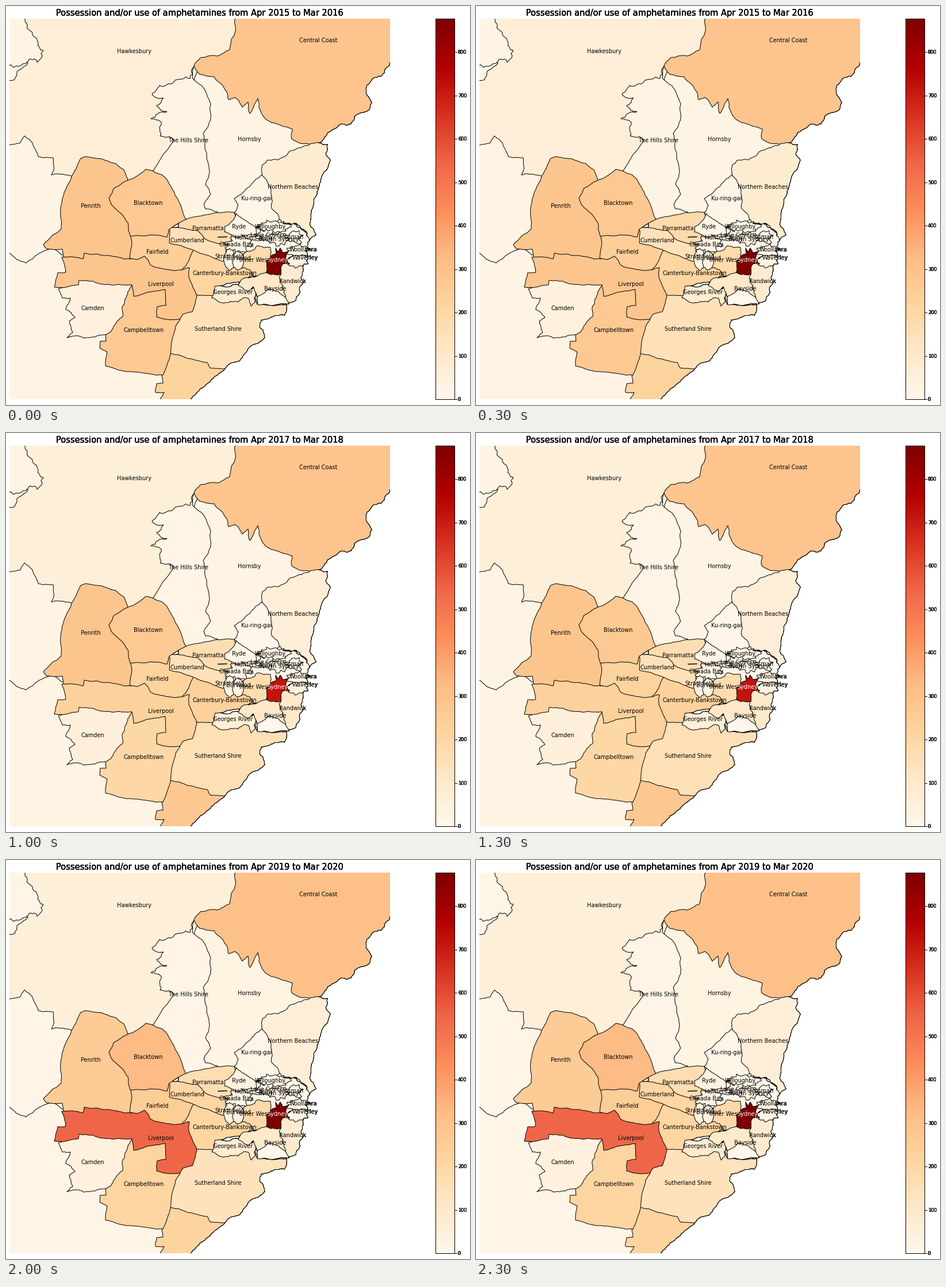
A matplotlib script for the animation above (2.5 s loop, 807 by 694 pixels).

```python
import numpy as np
import matplotlib.pyplot as plt
from matplotlib.animation import FuncAnimation
from matplotlib.collections import PolyCollection
from matplotlib.patches import Rectangle

W, H, DPI = 807, 694, 64
PX = 72 / DPI          # points per pixel
VMAX = 877
PASSES = 4             # repeated drawing thickens coast lines and outer text
LEFT, TOP, SIZE = 6, 22, 662
BAR_X, BAR_W = 747, 33
CMAP = plt.get_cmap("OrRd")
rng = np.random.default_rng(7)

shapes, values, labels = [], [], []


def split(a, b, amp):
    """Fractal line from a to b, without b, by midpoint displacement."""
    d = b - a
    if abs(d) < 4.5:
        return [a]
    shift = rng.uniform(-1, 1) * min(amp, 3.5 / abs(d))
    mid = (a + b) / 2 + 1j * d * shift
    return split(a, mid, amp) + split(mid, b, amp)


def rough(amp, *xy):
    pts = [complex(x, y) for x, y in zip(xy[::2], xy[1::2])]
    line = [p for a, b in zip(pts, pts[1:]) for p in split(a, b, amp)]
    return [(p.real, p.imag) for p in line + pts[-1:]]


def blob(x, y, rx, ry, jag):
    """Ragged ellipse for the small harbour suburbs."""
    t = np.linspace(0, 2 * np.pi, int(rx + ry), endpoint=False)
    r = 1 + jag * rng.uniform(-1, 1, t.size)
    return list(zip(x + rx * r * np.cos(t), y + ry * r * np.sin(t)))


def region(name, x, y, vals, shape):
    shapes.append(shape)
    values.append(np.broadcast_to(vals, 5))
    labels.append((name, x, y))


def suburb(name, x, y, val, rx, ry, jag=.3, dx=0, dy=0):
    region(name, x, y, val, blob(x + dx, y + dy, rx, ry, jag))


# Later regions cover earlier ones, so each shared border is traced once.
WEST = [26, 24, 24, 14, 16]
region("", 0, 0, WEST, rough(0, -20, 400, 150, 400, 330, 560, 290, 720, -20, 720))
region("", 0, 0, WEST, rough(
    .1, -20, 200, 130, 200, 130, 430, 97, 433, 79, 421, 58, 430, 35, 447,
    5, 429, -20, 425))
region("Hawkesbury", 223, 79, [68, 70, 62, 58, 62], rough(
    .1, -20, 5, 450, 5, 450, 60, 335, 140, 300, 300, 150, 310, 112, 295,
    79, 294, 82, 264, 56, 262, 46, 238, 32, 226, 25, 238, -20, 240))
region("", 0, 0, WEST, rough(.1, -20, 95, 38, 99, 19, 114, 15, 128, -20, 140))
region("", 0, 0, WEST, rough(
    .25, -20, 5, 36, 5, 33, 24, 46, 50, 65, 78, 54, 98, 42, 92, 24, 104, -20, 106))
region("Hornsby", 423, 232, [25, 25, 25, 42, 32], rough(
    0, 335, 108, 430, 130, 505, 220, 542, 238, 540, 260, 440, 350, 400, 375,
    350, 375, 315, 250, 328, 125))
region("Central Coast", 543, 60, [290, 375, 290, 318, 308], rough(
    .08, 401, 5, 399, 44, 389, 76, 366, 87, 338, 90, 327, 103, 337, 119,
    362, 123, 383, 148, 387, 163, 398, 159, 411, 176, 421, 167, 424, 187,
    438, 161, 446, 190, 462, 203, 498, 214, 497, 231, 512, 239, 544, 238)
    + rough(
    .2, 544, 238, 578, 208, 600, 205, 606, 192, 632, 180, 636, 168, 627, 154,
    632, 134, 658, 116, 669, 96, 690, 90, 690, 5))
region("The Hills Shire", 317, 234, [28, 22, 22, 20, 22], rough(
    .08, 327, 105, 324, 125, 341, 139, 356, 170, 356, 198, 343, 222, 349, 266,
    354, 288, 347, 310, 356, 327, 344, 345, 347, 353, 368, 358, 360, 375,
    310, 380, 270, 310, 253, 291)
    + rough(
    .03, 253, 291, 292, 234)
    + rough(
    .25, 292, 234, 268, 226, 270, 206, 252, 196, 280, 184, 262, 173, 274, 160,
    254, 154, 267, 138, 292, 132, 320, 126, 325, 108))
region("Northern Beaches", 499, 315, [85, 65, 68, 72, 66], rough(
    .15, 435, 345, 440, 330, 446, 294, 446, 276, 482, 263, 495, 252, 544, 238,
    559, 241, 556, 256, 564, 268, 549, 296, 541, 322, 533, 352, 528, 380,
    539, 398, 527, 409, 524, 396, 505, 378, 480, 376, 450, 370))
region("", 0, 0, [225, 305, 275, 225, 218], rough(
    .1, 270, 595, 340, 595, 390, 615, 380, 632, 346, 661, 320, 686, 315, 710,
    255, 710, 275, 672, 260, 672, 262, 657, 273, 656, 271, 636))
region("Sutherland Shire", 369, 562, [150, 150, 155, 150, 142], rough(
    .06, 290, 540, 310, 500, 430, 500, 437, 519, 488, 520)
    + rough(
    .15, 488, 520, 484, 538, 444, 546, 441, 558, 450, 577, 418, 602, 380, 631)
    + rough(
    .06, 380, 631, 356, 630, 350, 620, 284, 604, 275, 590))
region("Campbelltown", 240, 564, [268, 240, 200, 218, 215], rough(
    .05, 270, 480, 295, 535, 303, 545, 295, 557, 288, 584, 284, 614, 273, 642,
    173, 626, 176, 602, 163, 595, 164, 583, 174, 583, 172, 550, 205, 485))
region("Camden", 151, 526, [42, 30, 55, 42, 45], rough(
    .12, 91, 492, 127, 470, 219, 470, 219, 485, 207, 510, 203, 540, 180, 568,
    146, 577, 106, 577, 116, 568, 110, 548, 120, 542, 104, 528, 112, 508,
    98, 508, 91, 492))
region("Parramatta", 351, 387, [188, 190, 168, 195, 168], rough(
    .05, 300, 370, 313, 371, 362, 360, 397, 359, 402, 375, 390, 422, 360, 425,
    330, 405, 300, 395))
region("Cumberland", 315, 408, [150, 185, 148, 208, 208], rough(
    .06, 280, 384, 334, 391, 346, 405, 386, 416, 392, 440, 370, 455, 310, 430,
    270, 425))
region("Penrith", 147, 348, [285, 245, 285, 225, 260], rough(
    .05, 139, 262, 191, 274, 205, 285, 212, 303, 235, 400, 235, 450, 136, 450,
    100, 437, 98, 423, 70, 422, 65, 415, 96, 388, 98, 335, 107, 312, 122, 283,
    130, 265, 139, 262))
region("Fairfield", 263, 428, [245, 235, 225, 240, 252], rough(
    .04, 215, 390, 285, 390, 284, 412, 325, 424, 332, 445, 318, 465, 270, 470,
    215, 438, 219, 412))
region("Blacktown", 247, 343, [272, 265, 270, 310, 328], rough(
    .06, 243, 284, 272, 294, 288, 316, 313, 371, 284, 388, 280, 402, 216, 400,
    212, 377, 199, 360, 183, 345, 179, 334, 187, 318, 212, 303, 243, 284))
region("Canterbury-Bankstown", 380, 465, [215, 222, 235, 235, 212], rough(
    .07, 305, 460, 326, 425, 376, 444, 420, 445, 430, 468, 406, 480, 366, 488,
    362, 504, 324, 503, 315, 495))
region("Liverpool", 269, 484, [285, 260, 235, 312, 548], rough(
    .06, 97, 437, 134, 440, 136, 430, 228, 441, 241, 435, 252, 451, 290, 460,
    319, 455, 318, 472, 332, 506, 324, 532, 308, 536, 302, 545, 262, 541,
    263, 523, 278, 521, 277, 493, 238, 501, 222, 505, 219, 485, 127, 477,
    126, 485, 84, 489, 90, 464, 104, 463, 97, 437))

# Harbour, then the suburbs around it
region("", 0, 0, 8, rough(
    .3, 392, 400, 432, 384, 478, 372, 500, 378, 527, 404, 520, 432, 490, 440,
    430, 440, 384, 430, 392, 400))
region("", 0, 0, 0, rough(.1, 436, 470, 490, 470, 492, 518, 437, 519, 436, 470))
region("Ryde", 405, 384, [28, 22, 25, 25, 42], rough(
    .1, 401, 361, 418, 360, 434, 385, 437, 400, 400, 402, 380, 393, 380, 384,
    401, 361))
region("Ku-ring-gai", 436, 335, [14, 12, 12, 10, 16], rough(
    .1, 445, 294, 462, 330, 462, 352, 476, 371, 434, 385, 397, 359, 404, 346,
    397, 335, 424, 314, 445, 294))
suburb("Willoughby", 460, 384, 18, 26, 10, .25, dx=4)
suburb("Lane Cove", 451, 399, 14, 16, 9, .35)
suburb("Hunters Hill", 427, 403, 6, 20, 6, .45)
suburb("North Sydney", 476, 406, 30, 16, 9, .4, dx=-2)
suburb("Mosman", 497, 402, 12, 14, 10, .4, dx=4)
suburb("Canada Bay", 400, 415, 26, 20, 12, .4, dx=4)
region("Inner West", 432, 442, [182, 195, 172, 160, 190], rough(
    .15, 406, 456, 411, 432, 437, 417, 460, 420, 462, 455, 446, 470, 430, 470,
    424, 459, 406, 456))
suburb("Strathfield", 389, 436, 28, 10, 18, .08, dy=5)
suburb("Burwood", 404, 439, 38, 10, 16, .08, dy=4)
region("Georges River", 395, 498, [82, 85, 62, 70, 85], rough(
    .18, 364, 487, 412, 484, 420, 495, 436, 488, 433, 515, 426, 522, 421, 508,
    404, 515, 368, 513, 358, 508, 364, 487))
region("Bayside", 468, 492, [112, 115, 108, 108, 102], rough(
    .1, 404, 486, 412, 474, 452, 464, 478, 464, 490, 508, 456, 492, 437, 506,
    430, 488, 420, 496, 404, 486))
region("Randwick", 498, 479, [92, 78, 102, 110, 92], rough(
    .2, 480, 449, 517, 452, 511, 488, 504, 512, 492, 516, 478, 467, 480, 449))
suburb("Waverley", 520, 438, 38, 17, 11, .2, dx=-13, dy=5)
suburb("Woollahra", 517, 424, 30, 18, 10, .35, dx=-10, dy=2)
region("Sydney", 472, 442, [877, 802, 722, 695, 877], rough(
    .12, 463, 433, 470, 431, 469, 421, 474, 428, 477, 421, 481, 429, 491, 427,
    486, 438, 490, 446, 481, 449, 478, 467, 455, 465, 453, 444, 463, 433))

values = np.array(values, float)

fig = plt.figure(figsize=(W / DPI, H / DPI), dpi=DPI, facecolor="white")
ax = fig.add_axes([0, 0, 1, 1])
ax.imshow(np.linspace(0, 1, 256)[:, None], cmap=CMAP, aspect="auto",
          origin="lower", extent=(BAR_X, BAR_X + BAR_W, TOP + SIZE, TOP))
ax.set(xlim=(0, W), ylim=(H, 0))
ax.axis("off")


def write(x, y, text, size, z, ha="center"):
    return ax.text(x, y, text, fontsize=size * PX, family="DejaVu Sans",
                   ha=ha, va="baseline", zorder=z)


def stroke(xs, ys, width, z):
    ax.plot(xs, ys, color="black", lw=width * PX, zorder=z)


def draw_bar(z):
    ax.add_patch(Rectangle((BAR_X, TOP), BAR_W, SIZE, fill=False,
                           lw=.8 * PX, zorder=z))
    right = BAR_X + BAR_W
    for v in range(0, VMAX, 100):
        y = TOP + SIZE * (1 - v / VMAX)
        stroke([right, right + 3.5], [y, y], .8, z)
        write(right + 6, y + 3, str(v), 8.13, z, "left")


frame_box = Rectangle((LEFT, TOP), SIZE, SIZE, transform=ax.transData)
maps, titles, sydney = [], [], []
for z in range(5, 5 + PASSES):
    polys = PolyCollection(shapes, edgecolors="black", linewidths=PX, zorder=z)
    ax.add_collection(polys, autolim=False)
    polys.set_clip_path(frame_box)
    maps.append(polys)
    stroke([369, 384], [402, 401.5], 1.5, z)
    texts = [write(x, y + 3, name, 9.75, z + .5) for name, x, y in labels]
    sydney.append(texts[-1])
    titles.append(write(336.5, 17, "", 14.62, z))
    draw_bar(z)


def update(i):
    colors = CMAP(values[:, i] / VMAX)
    year = 2015 + i
    for polys, title, name in zip(maps, titles, sydney):
        polys.set_facecolor(colors)
        title.set_text("Possession and/or use of amphetamines "
                       f"from Apr {year} to Mar {year + 1}")
        name.set_color("white" if values[-1, i] > 710 else "black")
    return maps + titles + sydney


anim = FuncAnimation(fig, update, frames=5, interval=500, repeat=True)
plt.show()
```
